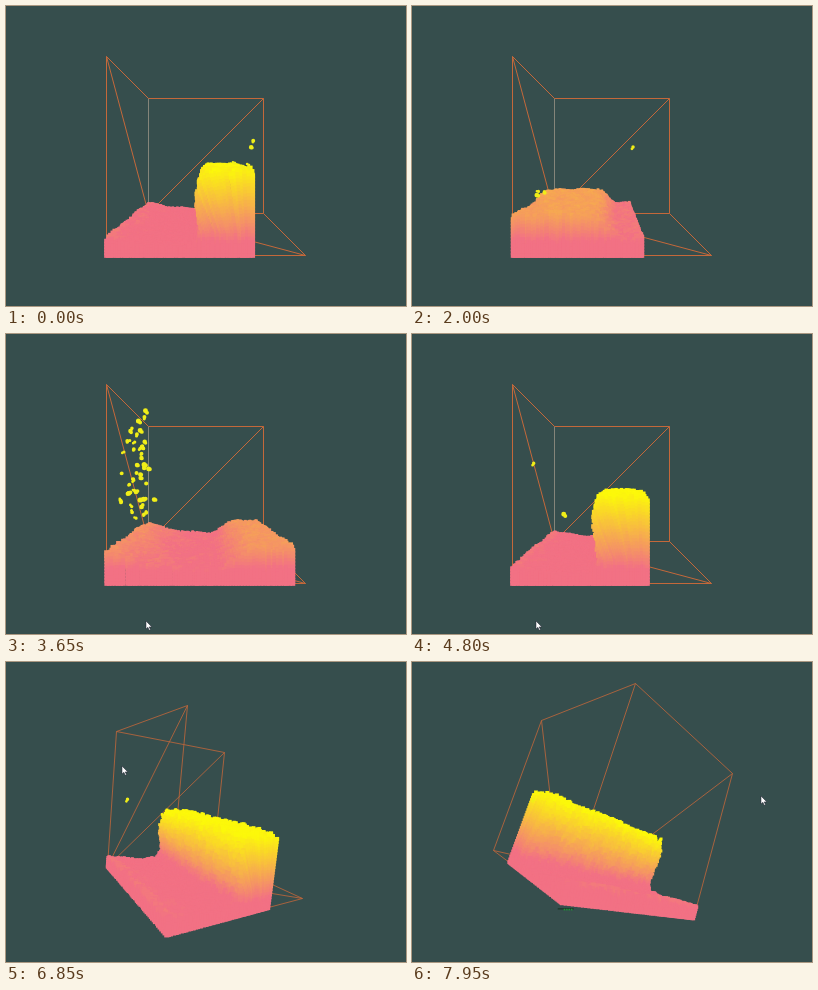
Animation, 400 px wide and 300 px high, one loop 8 s. Source, as an HTML page with a canvas:

```html
<!DOCTYPE html>
<html lang="en">
<head>
<meta charset="utf-8">
<title>Fluid in a box</title>
<style>
html, body { margin: 0; width: 100%; height: 100%; overflow: hidden; background: #364e4d; }
canvas { display: block; width: 400px; height: 300px; }
</style>
</head>
<body>
<canvas id="stage" width="400" height="300"></canvas>
<script>
const ctx = document.getElementById('stage').getContext('2d');
const LOOP = 8000, STEP = 50, FREEZE = 4850, TURN = 6000;
const PERIOD = 4600, VOLUME = .105;
const FOCAL = 267, DISTANCE = 1.841;
const NX = 64, NZ = 56, DOT = 0.023, GRAVITY = 220;

// time, pitch, roll
const TILT = [[TURN, 0, 0], [6850, .097, -.101], [7950, -.123, -.313]];
// time, x, y
const POINTER = [
  [3300, 400, 306], [3650, 140, 287], [4800, 124, 287], [5150, 124, 287],
  [5950, 28, 92], [6850, 116, 104], [7700, 335, 132], [7950, 349, 134]
];
// side: 0 left wall, 1 moving wall
const BURSTS = [
  { side: 0, from: 1950, span: 1150, count: 75, base: 190, rise: 25, more: 95 },
  { side: 1, from: -500, span: 1250, count: 20, base: 172, rise: 10, more: 55 }
];
// box corners: x, y, depth
const CORNERS = {
  A: [0,1,0], B: [0,1,1], C: [1,1,1], D: [1,0,1], E: [0,0,1], F: [0,0,0], G: [1,0,0]
};
const EDGES = 'AB AF AE BE BC CD CE DE DG FG EG EF'.split(' ');

const clamp = (v, lo = 0, hi = 1) => Math.min(hi, Math.max(lo, v));
const mix = (a, b, k) => a + (b - a) * k;
const smooth = (a, b, v) => {
  const k = clamp((v - a) / (b - a));
  return k * k * (3 - 2 * k);
};
const hash = (a, b) => {
  const n = Math.sin(a * 127.1 + b * 311.7) * 43758.5453;
  return n - Math.floor(n);
};
const PALETTE = Array.from({ length: 40 }, (_, i) => {
  const k = i / 39;
  return `rgb(${mix(242, 252, k)},${mix(113, 248, k)},${mix(132, 10, k)})`;
});

function track(rows, t) {
  const last = rows[rows.length - 1];
  if (t <= rows[0][0]) return rows[0].slice(1);
  if (t >= last[0]) return last.slice(1);
  const i = rows.findIndex(row => row[0] > t);
  const a = rows[i - 1], b = rows[i], k = (t - a[0]) / (b[0] - a[0]);
  return a.slice(1).map((v, j) => mix(v, b[j + 1], k));
}

// A swell once per period, highest at the given phase
const swell = (t, peak, power) =>
  ((1 + Math.cos(2 * Math.PI * (t / PERIOD - peak))) / 2) ** power;
const wallAt = t => .735 - .21 * Math.sin(t * 2 * Math.PI / PERIOD);

// Water piles up at either end; the level between them keeps the volume.
function makeSurface(t) {
  const wall = wallAt(t);
  const left = .08 + .14 * swell(t, .58, 1.5);
  const right = .06 + .37 * swell(t, .06, 1.5);
  const plume = .47 * swell(t, .6, 9);
  const level = Math.max(.035,
    ((VOLUME - plume * .04) / wall - left * .167 - right * .3) / .533);
  const height = (s, z) => {
    const dx = s * wall / .11, dz = (z - .68) / .24;
    return level + (left - level) * clamp(1 - s * 2) ** 2
      + (right - level) * smooth(.57, .83, s)
      + plume * Math.exp(-dx * dx - dz * dz);
  };
  return { wall, height, lip: 1.7 * swell(t, .03, 4) };
}

function camera(yaw, pitch, roll) {
  const cy = Math.cos(yaw), sy = Math.sin(yaw);
  const cp = Math.cos(pitch), sp = Math.sin(pitch);
  const cr = Math.cos(roll), sr = Math.sin(roll);
  return (px, py, pz) => {
    const x = px - .5, y = py - .5, z = .5 - pz;
    const x1 = x * cy + z * sy, z1 = z * cy - x * sy;
    const y1 = y * cp - z1 * sp, z2 = y * sp + z1 * cp;
    const depth = DISTANCE - z2, scale = FOCAL / depth;
    return [200 + (x1 * cr - y1 * sr) * scale, 150 - (x1 * sr + y1 * cr) * scale, depth];
  };
}

function drawBox(project, turned) {
  ctx.lineWidth = turned ? .8 : 1;
  for (const edge of EDGES) {
    const ends = [...edge].map(name => project(...CORNERS[name]));
    ctx.strokeStyle = edge === 'BE' && !turned ? '#84857a' : '#c4683a';
    ctx.beginPath();
    for (const [x, y] of ends) ctx.lineTo(Math.floor(x) + .5, Math.floor(y) + .5);
    ctx.stroke();
  }
}

function fluidDots(t, project) {
  const { wall, height, lip } = makeSurface(t);
  const seed = Math.floor(t / 150);
  const heights = Array.from({ length: NX + 1 }, (_, i) =>
    Array.from({ length: NZ + 1 }, (_, k) => {
      const h = height(i / NX, k / NZ);
      const ripple = .005 * Math.sin(i * .31 + k * .23 + t / 300);
      return Math.max(.02, h + ripple + (.012 + .08 * h) * (hash(i + seed, k) - .5));
    }));
  const dots = [];
  for (let i = 0; i <= NX; i++) for (let k = 0; k <= NZ; k++) {
    const top = heights[i][k];
    const rim = i === 0 || k === 0 || i === NX || k === NZ;
    const floor = rim ? 0 : Math.min(top, heights[i - 1][k], heights[i + 1][k],
      heights[i][k - 1], heights[i][k + 1]);
    const wobble = hash(i + 7, k + seed) - .5;
    const blotch = .03 * Math.sin(i * .37 + 2 * Math.sin(k * .29)) * Math.sin(k * .41);
    const count = Math.ceil((top - floor) / .017);
    for (let n = 0; n <= count; n++) {
      const y = mix(top, floor, n / (count || 1));
      const lean = lip * Math.max(0, y - .12) * (1 - i / NX);
      const x = clamp(i / NX * wall - lean + wobble * .009, 0, wall);
      const heat = clamp((y - .07) / .37 + blotch + wobble * .08);
      dots.push([...project(x, y, k / NZ), PALETTE[Math.round(heat * 39)]]);
    }
  }
  return dots.sort((a, b) => b[2] - a[2]);
}

function drawFluid(t, project) {
  for (const [x, y, depth, color] of fluidDots(t, project)) {
    const size = DOT * FOCAL / depth;
    ctx.fillStyle = color;
    ctx.fillRect(x - size / 2, y - size / 2, size, size);
  }
}

// Droplets thrown up at a wall, each on its own parabola
function drawSpray(t) {
  ctx.fillStyle = '#f0ee18';
  for (const { side, from, span, count, base, rise, more } of BURSTS) {
    for (let n = 0; n < count; n++) {
      const [a, b, c, d] = [1, 2, 3, 4].map(k => hash(n + side * 50, k));
      const launch = from + span * a, age = (t - launch) / 1000;
      const speed = Math.sqrt(2 * GRAVITY * (rise + more * b * b));
      if (age < 0 || age > 2 * speed / GRAVITY) continue;
      const x = 125 + side * wallAt(t) * 150 + (c - .4) * 24 + (d - .4) * 22 * age;
      const y = base - speed * age + GRAVITY * age * age / 2;
      const size = 1.5 + d * 1.1;
      ctx.beginPath();
      ctx.arc(x, y, size, 0, 7);
      ctx.arc(x + (d - .5) * 4, y + (b - .5) * 4, size * .8, 0, 7);
      ctx.fill();
    }
  }
}

function drawPointer(t, [x, y]) {
  if (t < POINTER[0][0]) return;
  const arrow = new Path2D('M0 0V8L1.9 6.3L3.2 9.3L4.5 8.7L3.2 5.9H5.8Z');
  ctx.save();
  ctx.translate(x, y);
  ctx.fillStyle = '#fff';
  ctx.strokeStyle = '#223';
  ctx.lineWidth = .5;
  ctx.fill(arrow);
  ctx.stroke(arrow);
  ctx.restore();
}

function drawMarker(project, yaw) {
  if (yaw < 1.9) return;
  const [x, y] = project(...CORNERS.E);
  ctx.fillStyle = '#14301c';
  ctx.fillRect(x - 5, y + 6, 16, 1);
  ctx.fillStyle = '#1c9a34';
  for (let i = 0; i < 4; i++) ctx.fillRect(x + 1 + i * 2.4, y + 6.4, 1.4, 1.6);
}

function draw(t) {
  const pointer = track(POINTER, t);
  // dragging sideways turns the box
  const yaw = t > TURN ? (pointer[0] - 28) * .007 : 0;
  const project = camera(yaw, ...track(TILT, t));
  const simTime = Math.min(t, FREEZE);
  ctx.fillStyle = '#364e4d';
  ctx.fillRect(0, 0, 400, 300);
  drawBox(project, yaw > 0);
  drawFluid(simTime, project);
  drawSpray(simTime);
  drawMarker(project, yaw);
  drawPointer(t, pointer);
}

const start = performance.now();
let shown = -1;
function tick() {
  const t = Math.floor((performance.now() - start) % LOOP / STEP) * STEP;
  if (t !== shown) draw(shown = t);
  requestAnimationFrame(tick);
}
tick();
</script>
</body>
</html>
```
